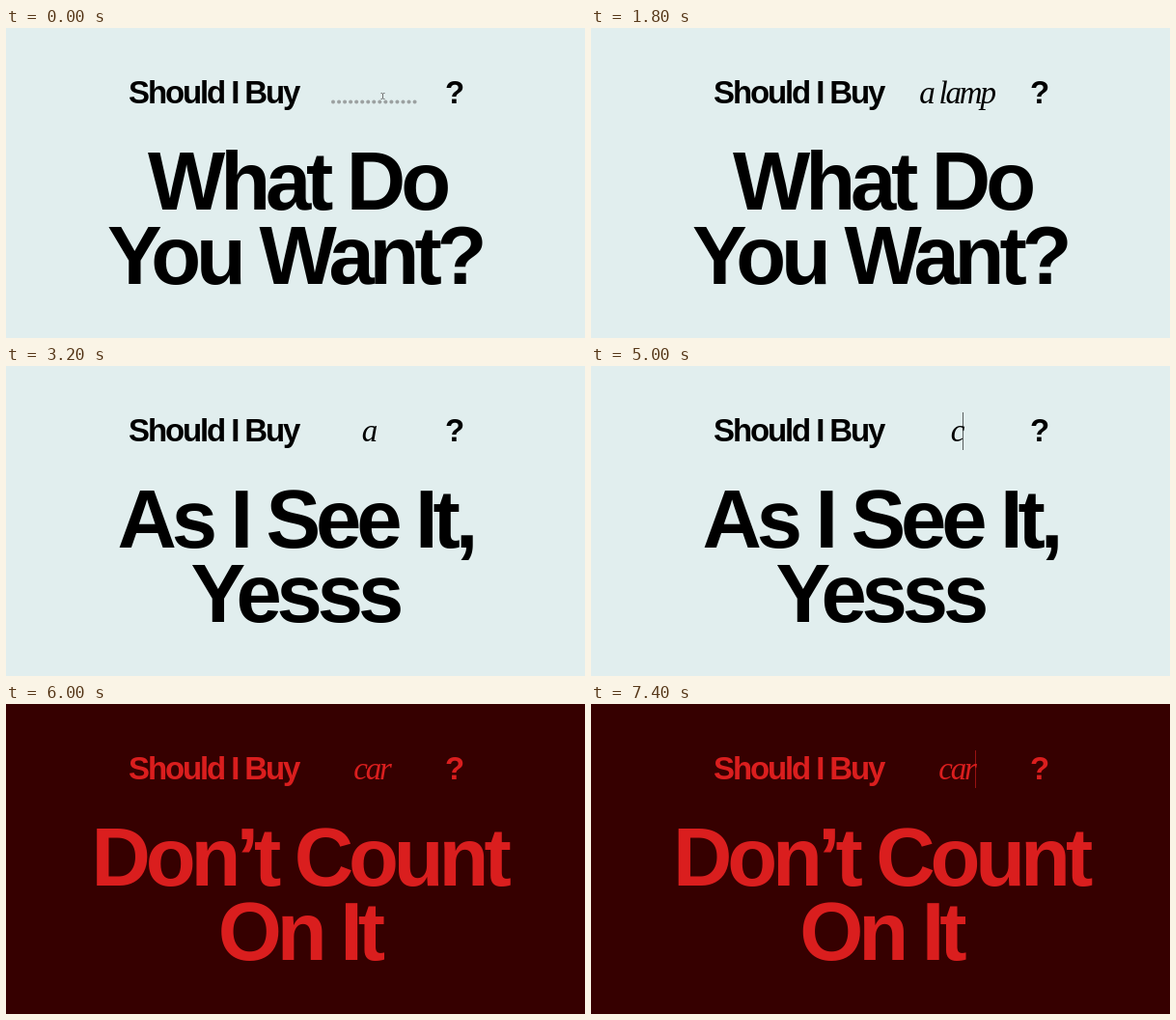
An HTML page for the animation above (7.5 s loop, 600 px wide and 321 px high).

```html
<!DOCTYPE html>
<html lang="en">
<head>
<meta charset="utf-8">
<title>Should I Buy</title>
<style>
  html, body { margin: 0; width: 100%; height: 100%; overflow: hidden; }
  svg { display: block; width: 600px; height: 321px; background: #e1eeee; fill: #000; }
  svg.no { background: #360000; fill: #da1e1e; }
  text { font-family: "Liberation Sans", Arial, sans-serif; font-weight: bold; letter-spacing: -.06em; white-space: pre; }
  .ask { font-size: 33px; letter-spacing: -.064em; }
  .big { font-size: 85px; }
  #item { font: italic 33px "Liberation Serif", "Times New Roman", serif; letter-spacing: -2.2px; }
</style>
</head>
<body>
<svg id="stage" viewBox="0 0 600 321">
  <text class="ask" x="127" y="78">Should I Buy</text>
  <text class="ask" x="455" y="78">?</text>
  <text id="item" y="78"></text>
  <g id="dots" fill="#9ca1a1"></g>
  <path id="mouse" d="M388.5 67.5h1.3l.7.7.7-.7h1.3M390.5 68v5M388.5 73.5h1.3l.7-.7.7.7h1.3" fill="none" stroke="#555" stroke-width=".8"/>
  <rect id="caret" y="48" width="1" height="39" opacity=".6"/>
  <g id="answer"><text class="big" y="187.5"></text><text class="big" y="265"></text></g>
</svg>
<script>
const LOOP = 7500, CENTER = 379, BLINK = 500;
const $ = id => document.getElementById(id);
const item = $('item'), caret = $('caret'), lines = $('answer').children;

// [start, typed text]
const typing = [
  [0, ''], [200, 'a'], [400, 'a '], [600, 'a l'], [700, 'a la'], [900, 'a lam'], [1300, 'a lamp'],
  [2100, 'a lam'], [2300, 'a la'], [2500, 'a l'], [2700, 'a '], [3600, 'a'], [4000, ''],
  [5000, 'c'], [5100, 'ca'], [5400, 'car']
];

// [start, two lines of [text, x]]
const answers = [
  [0, ['What Do', 147], ['You Want?', 105]],
  [1900, ['As I See It,', 115.5], ['Yesss', 191.5]],
  [6000, ['Don’t Count', 85], ['On It', 216.3]]
];

// [start, sideways shift of the answer]
const shakes = [[0, 0], [6000, 3.5], [6100, -3.5], [6200, 3], [6300, -2], [6400, 0]];

const at = (list, t) => list.filter(step => step[0] <= t).pop();

for (let i = 0; i < 15; i++) {
  const dot = document.createElementNS('http://www.w3.org/2000/svg', 'circle');
  dot.setAttribute('cx', 339 + i * 6.04);
  dot.setAttribute('cy', 76.5);
  dot.setAttribute('r', 2);
  $('dots').append(dot);
}

function setText(node, text) {
  if (node.textContent !== text) node.textContent = text;
}

function show(node, on) {
  node.style.display = on ? '' : 'none';
}

function draw(now) {
  const t = now % LOOP;
  const [since, typed] = at(typing, t);
  setText(item, typed.replace(/ /g, '\u00a0'));
  const width = typed ? item.getComputedTextLength() : 0;
  item.setAttribute('x', CENTER - width / 2);
  caret.setAttribute('x', Math.round(CENTER + width / 2));
  show(caret, since > 0 && Math.floor((t - since) / BLINK) % 2 === 0);
  show($('dots'), !typed);
  show($('mouse'), since === 0);

  const [start, ...answer] = at(answers, t);
  answer.forEach(([text, x], i) => {
    setText(lines[i], text);
    lines[i].setAttribute('x', x);
  });
  $('answer').setAttribute('transform', `translate(${at(shakes, t)[1]} 0)`);
  $('stage').classList.toggle('no', start === 6000);
  requestAnimationFrame(() => draw(performance.now()));
}
draw(0);
</script>
</body>
</html>
```
